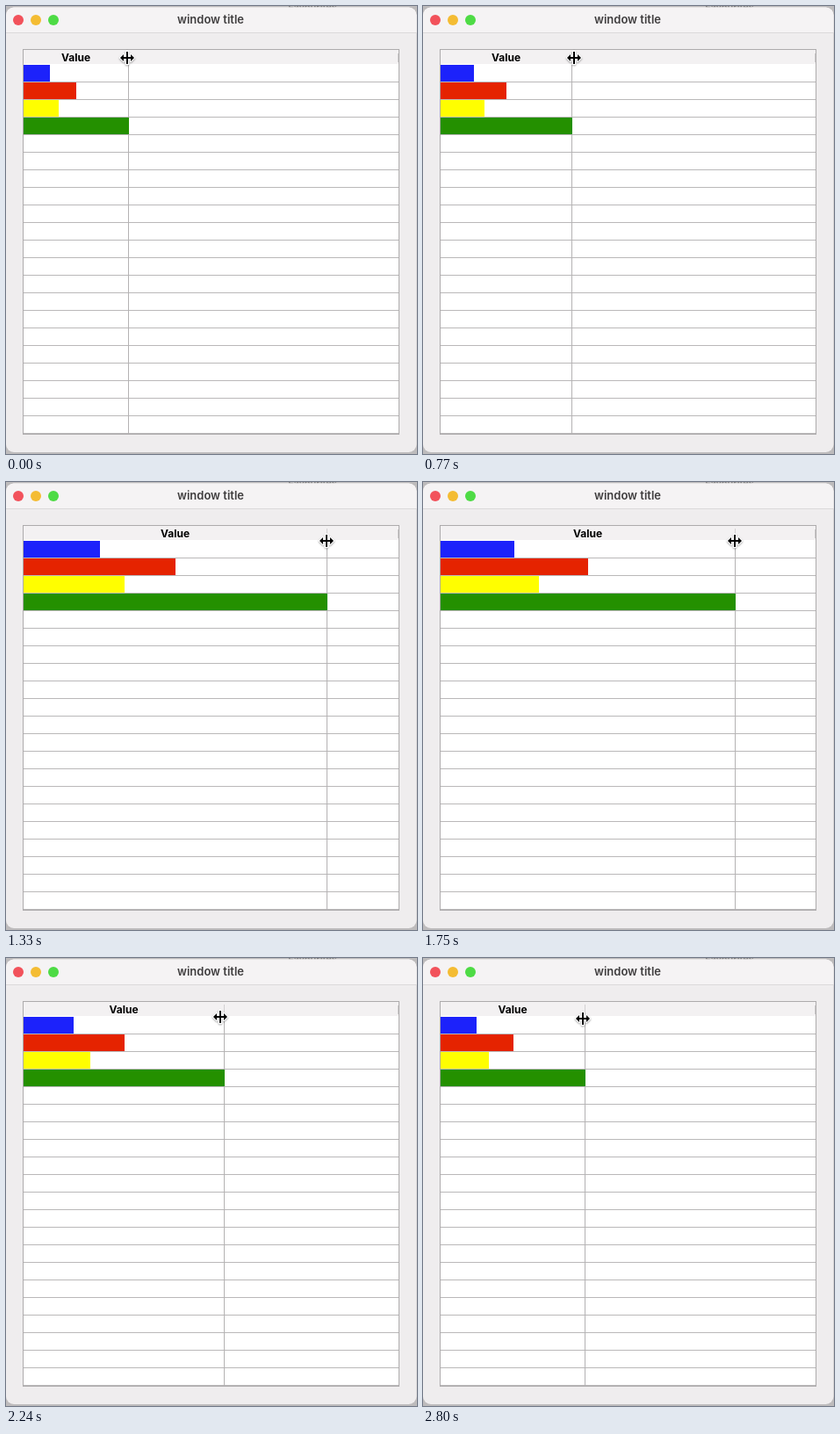
Animation of 468 by 510 pixels, one loop 2870 ms. Source, as an HTML page with a canvas:

```html
<!DOCTYPE html>
<html lang="en">
<head>
<meta charset="utf-8">
<title>Resizable column</title>
<style>
  html, body { margin: 0; width: 100%; height: 100%; overflow: hidden; background: #bdbbbc; }
  canvas { display: block; }
</style>
</head>
<body>
<canvas id="stage" width="468" height="510"></canvas>
<script>
const ctx = document.getElementById('stage').getContext('2d');
const STEP = 70, STEPS = 41, LEFT = 20;

// step, divider x, divider speed per step, pointer offset from divider, pointer y
const keys = [
  [0, 139, 0, -1, 59],
  [7, 139, 0, -1, 59],
  [8, 140, 5, 3, 59],
  [15, 251, 27, 4, 60],
  [19, 365, 23, 0, 67],
  [19.01, 365, 0, 0, 67],
  [23, 365, -2, 0, 67],
  [28, 317, -17, -1, 68],
  [32, 248, -15, -4, 67],
  [40, 184, -2, -2, 69],
];

const bars = [
  ['#1c22fb', 1 / 4],
  ['#e52300', 1 / 2],
  ['#fffe00', 1 / 3],
  ['#249000', 1],
];

function rect(x, y, w, h, color) {
  ctx.fillStyle = color;
  ctx.fillRect(x, y, w, h);
}

function label(text, x, y, font, color) {
  ctx.font = font + ' Inter, sans-serif';
  ctx.textAlign = 'center';
  ctx.fillStyle = color;
  ctx.fillText(text, x, y);
}

function poseAt(step) {
  // The pause after the drag to the right ends with a fresh start at step 22.
  if (step >= 19 && step <= 23) return { divider: step < 23.5 && step > 23 ? 364 : step === 23 + 1 ? 364 : 365, x: 365, y: 67 };
  let i = keys.findIndex(k => k[0] > step);
  if (i < 0) i = keys.length - 1;
  const [s0, x0, v0, o0, y0] = keys[i - 1], [s1, x1, v1, o1, y1] = keys[i];
  const span = s1 - s0, u = (step - s0) / span, r = 1 - u;
  const divider = Math.round(
    x0 * r * r * (1 + 2 * u) + x1 * u * u * (3 - 2 * u) +
    span * u * r * (v0 * r - v1 * u));
  return {
    divider,
    x: Math.round(divider + o0 + (o1 - o0) * u),
    y: Math.round(y0 + (y1 - y0) * u),
  };
}

function drawWindow() {
  rect(0, 0, 468, 510, '#bdbbbc');
  label('Favourites', 349, 5, '600 11px', '#777');
  ctx.beginPath();
  ctx.roundRect(0, 1.5, 467.5, 506.5, 9);
  ctx.fillStyle = '#efedee';
  ctx.fill();
  ctx.save();
  ctx.clip();
  rect(0, 1, 468, 29, '#f5f3f4');
  rect(0, 30, 468, 1, '#dbd9da');
  ctx.restore();
  ['#f2525b', '#f4bc33', '#4edb45'].forEach((color, i) => {
    ctx.beginPath();
    ctx.arc(14 + 20 * i, 16, 6, 0, 2 * Math.PI);
    ctx.fillStyle = color;
    ctx.fill();
  });
  label('window title', 233, 20, '600 13px', '#3f3d3e');
}

function drawTable(divider) {
  const width = divider + 1 - LEFT;
  rect(19, 49, 429, 439, '#adabac');
  rect(20, 50, 427, 437, '#fff');
  rect(20, 50, 427, 16, '#f3f1f2');
  rect(446, 54, 1, 10, '#cccacb');
  rect(divider, 53, 1, 12, '#d3d1d2');
  for (let y = 86; y <= 486; y += 20) rect(20, y, 427, 1, '#bab8b9');
  rect(divider, 67, 1, 420, '#b4b2b3');
  bars.forEach(([color, share], i) =>
    rect(LEFT, 67 + 20 * i, Math.round(width * share), 19, color));
  label('Value', LEFT - 0.5 + width / 2, 63, '700 12px', '#000');
}

function drawPointer(x, y) {
  const shape = new Path2D(
    'M-1-7H1V-1H4V-4L8 0L4 4V1H1V7H-1V1H-4V4L-8 0L-4-4V-1H-1Z');
  ctx.save();
  ctx.translate(x, y);
  ctx.shadowColor = 'rgba(0,0,0,.35)';
  ctx.shadowBlur = 2;
  ctx.shadowOffsetY = 1;
  ctx.lineWidth = 2.4;
  ctx.lineJoin = 'round';
  ctx.strokeStyle = '#fff';
  ctx.stroke(shape);
  ctx.shadowColor = 'transparent';
  ctx.fillStyle = '#000';
  ctx.fill(shape);
  ctx.restore();
}

function frame(now) {
  const pose = poseAt(Math.floor(now / STEP) % STEPS);
  drawWindow();
  drawTable(pose.divider);
  drawPointer(pose.x, pose.y);
  requestAnimationFrame(frame);
}
requestAnimationFrame(frame);
</script>
</body>
</html>
```
